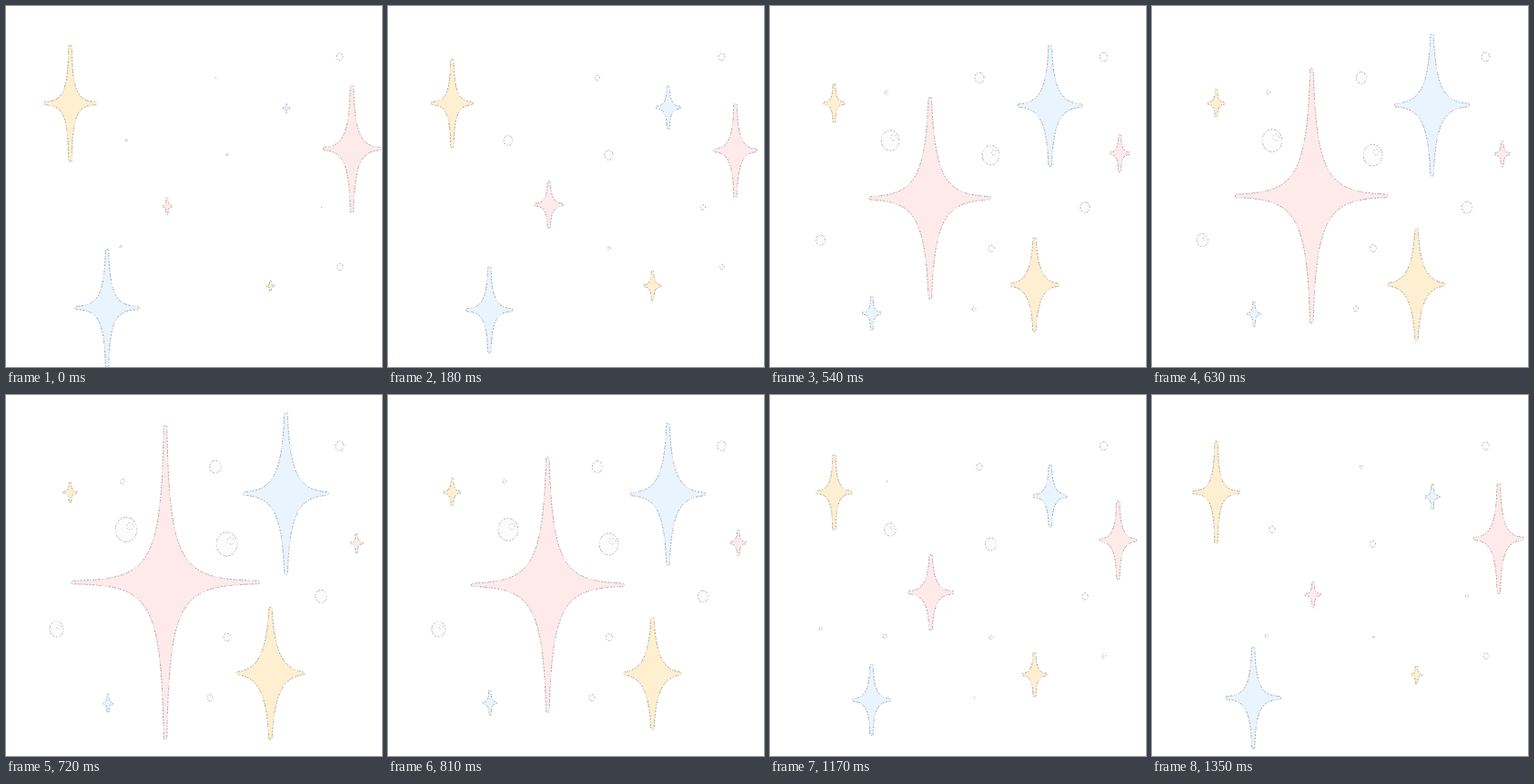
These frames come from a looping animation (413x397 px, 1.44 s). An HTML page with a canvas:

```html
<!DOCTYPE html>
<html lang="en">
<head>
<meta charset="utf-8">
<title>Twinkling stars</title>
<style>
html, body { margin: 0; width: 100%; height: 100%; overflow: hidden; background: #fff; }
canvas { display: block; width: 413px; height: 397px; }
</style>
</head>
<body>
<canvas id="sky" width="413" height="397"></canvas>
<script>
const ctx = document.getElementById('sky').getContext('2d');
const STEP = 90, STEPS = 16;
const PINK = '#feeaea', YELLOW = '#fdefcf', BLUE = '#e9f4fe';

// x, y: hub at full size; dx, dy: its shift when smallest
// w, h: [smallest, largest]; belly: fullness of the sides at full size
const stars = [
  { fill: YELLOW, peak: 0, ease: 1.2, x: 70.5, y: 107, dx: 0, dy: 0, w: [16, 59], h: [23, 129], belly: .4 },
  { fill: PINK, peak: 0, ease: 1.3, x: 380, y: 157, dx: 5, dy: 6, w: [15, 64], h: [22, 141], belly: .46 },
  { fill: BLUE, peak: 0, ease: 1.33, x: 111, y: 332, dx: 1, dy: 7, w: [12, 71], h: [21, 130], belly: .42 },
  { fill: PINK, peak: 8, ease: 1.65, x: 175, y: 206, dx: 2, dy: 14, w: [12, 208], h: [19, 346], belly: .22 },
  { fill: BLUE, peak: 8, ease: 1.08, x: 307.5, y: 108.5, dx: .5, dy: 4, w: [8, 95], h: [10, 180], belly: .45 },
  { fill: YELLOW, peak: 8, ease: 1.3, x: 290.5, y: 306, dx: 0, dy: 2, w: [9, 75], h: [12, 146], belly: .58 }
];

// d: diameter at the peak; span: steps from the peak to nothing
const bubble = (x, y, d, peak = 8, span = 8.3) => ({ x, y, d, peak, span });
const bubbles = [
  bubble(230, 79, 13),
  bubble(132, 148, 25),
  bubble(242.5, 164, 24),
  bubble(346, 221.5, 13),
  bubble(243, 266.5, 8),
  bubble(128, 95, 5, 8, 6),
  bubble(366.5, 56, 10, 9, 20),
  bubble(55.5, 257.5, 17, 8.5, 5),
  bubble(224, 333, 7, 8.5, 5),
  bubble(367, 287, 7, 0, 6),
  bubble(126, 265, 5, 13.5, 4)
];

const mix = (a, b, t) => a + (b - a) * t;

// 1 at the peak, falling evenly to 0 on both sides, around the loop.
function pulse(step, peak, span) {
  const gap = Math.abs(step - peak);
  return Math.max(0, 1 - Math.min(gap, STEPS - gap) / span);
}

// Irregular dashes give a speckled pencil line.
let seed = 7;
const random = () => (seed = seed * 16807 % 2147483647) / 2147483647;
const specks = Array.from({ length: 24 }, () => .5 + 2 * random());

function outline(path, color) {
  ctx.strokeStyle = color;
  ctx.setLineDash(specks);
  ctx.stroke(path);
}

function starPath(h, w, belly) {
  const path = new Path2D();
  const tip = Math.min(1.8, .9 + h * .015);
  const rx = w / 2, ry = h / 2;
  const curve = (...pts) => path.bezierCurveTo(...pts.flat());

  // One concave quarter between an upright and a level tip.
  const quarter = (sx, sy) => [
    [sx * tip, sy * (ry - tip)],
    [sx * rx * belly * .2, sy * ry * belly * .38],
    [sx * rx * belly * .8, sy * ry * belly * .1],
    [sx * (rx - tip), sy * tip]
  ];
  const capX = s => curve([s * rx, -s * tip], [s * rx, s * tip], [s * (rx - tip), s * tip]);
  const capY = s => curve([s * tip, s * ry], [-s * tip, s * ry], [-s * tip, s * (ry - tip)]);

  path.moveTo(tip, tip - ry);
  for (const s of [1, -1]) {
    curve(...quarter(s, -s).slice(1));
    capX(s);
    curve(...quarter(s, s).reverse().slice(1));
    capY(s);
  }
  path.closePath();
  return path;
}

function drawStar(s, step) {
  const size = pulse(step, s.peak, STEPS / 2) ** s.ease;
  const path = starPath(mix(...s.h, size), mix(...s.w, size), mix(.65, s.belly, size));
  ctx.save();
  ctx.translate(s.x + s.dx * (1 - size), s.y + s.dy * (1 - size));
  ctx.fillStyle = s.fill;
  ctx.fill(path);
  outline(path, 'rgba(85, 80, 85, .7)');
  ctx.restore();
}

function drawBubble(b, step) {
  const r = b.d / 2 * pulse(step, b.peak, b.span) ** .7;
  if (r < .6) return;
  const path = new Path2D();
  path.ellipse(b.x, b.y, r * .95, r * 1.08, 0, 0, Math.PI * 2);
  ctx.fillStyle = '#fcfcfc';
  ctx.fill(path);
  outline(path, 'rgba(80, 80, 80, .65)');
  if (r > 6.5) {
    const shine = new Path2D();
    shine.arc(b.x + r * .35, b.y - r * .3, r * .3, 0, Math.PI * 2);
    outline(shine, 'rgba(80, 80, 80, .4)');
  }
}

function draw(time) {
  const step = Math.floor(time / STEP) % STEPS;
  ctx.fillStyle = '#fff';
  ctx.fillRect(0, 0, 413, 397);
  ctx.lineWidth = .7;
  bubbles.forEach(b => drawBubble(b, step));
  stars.forEach(s => drawStar(s, step));
}

const start = performance.now();
function tick() {
  draw(performance.now() - start);
  requestAnimationFrame(tick);
}
tick();
</script>
</body>
</html>
```
